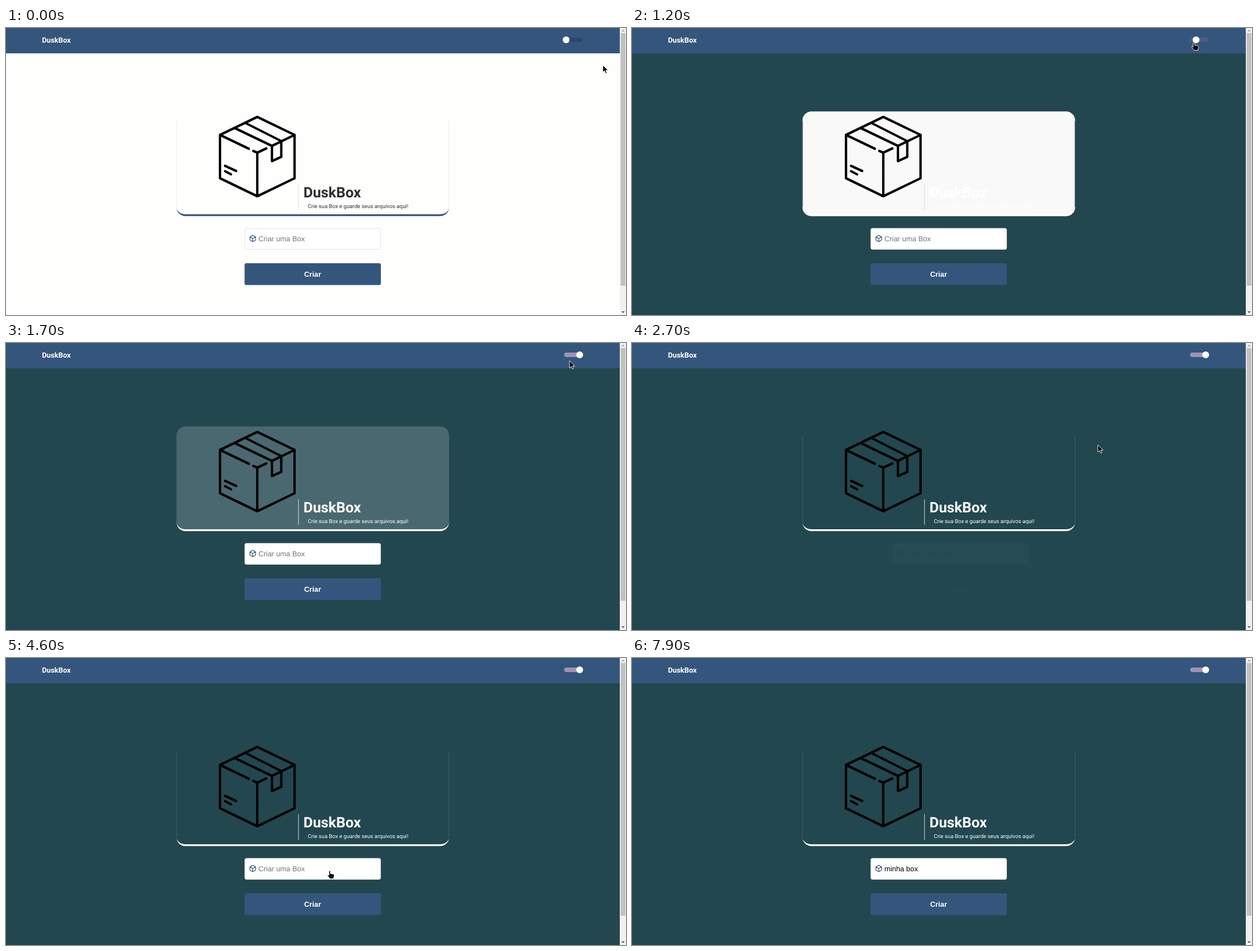
These frames come from a looping animation (1098x510 px, 8000 ms). An HTML page:

```html
<!DOCTYPE html>
<html lang="pt">
<head>
<meta charset="utf-8">
<title>DuskBox</title>
<style>
  html, body { margin: 0; width: 100%; height: 100%; overflow: hidden; }
  svg { display: block; width: 1098px; height: 510px; --page: #fefefd; --ink: #2f2f2f; --accent: #35567c; --side: #e9e9ea; --edge: #35567c; }
  svg.dark { --page: #22474f; --ink: #fff; --side: #43626a; --edge: #fefefe; }
  text { text-rendering: geometricPrecision; white-space: pre; }
  .brand { font-family: Roboto, sans-serif; font-weight: 700; }
  .control { font: 12.86px "Liberation Sans", Arial, sans-serif; }
  .line { fill: none; stroke-linecap: round; stroke-linejoin: round; }
</style>
</head>
<body>
<svg id="stage" viewBox="0 0 1098 510">
  <rect width="1098" height="510" fill="var(--page)"/>
  <rect width="1087" height="45" fill="#35567c"/>
  <text class="brand" x="63.7" y="25.6" font-size="12.86" fill="#fff">DuskBox</text>
  <rect id="track" x="988.5" y="17" width="32.5" height="8" rx="4"/>
  <circle id="knob" cy="21" r="6.1" fill="#fefeff"/>

  <rect id="card" x="301.8" y="148.3" width="483" height="185.9" rx="16" fill="#fdfdfd"/>
  <path d="M302.2 165V318M784.4 165V318" stroke="var(--side)" stroke-width=".9"/>
  <path fill="var(--edge)" d="M301.8 318A16 16 0 0 0 318 334.2H768.6A16 16 0 0 0 784.8 318A16 13 0 0 1 768.6 331H318A16 13 0 0 1 301.8 318Z"/>
  <path class="line" stroke="#000" stroke-width="4.2" d="M379 190L445 158L511 190V267L445 299L379 267ZL430 214.5M438 218.5L445 221.5L461 214M445 221.5V299M423.5 168.5L487.5 201V229L471 236.5V209.5L405.5 178M471 209.5L511 190M388 245L407.5 254M388 254.5L398.5 260"/>
  <path d="M518 277.5V323" stroke="#ddd"/>
  <text class="brand" x="526.7" y="301.4" font-size="25.72" fill="var(--ink)">DuskBox</text>
  <text x="534.5" y="320" font-family="Roboto, sans-serif" font-size="9.65" fill="var(--ink)">Crie sua Box e guarde seus arquivos aqui!</text>

  <g id="form">
    <rect x="422.9" y="355.9" width="240.6" height="37.6" rx="3" fill="#fff" stroke="#ddd" stroke-width=".8"/>
    <path class="line" stroke="#35567c" stroke-width="1.25" d="M437 368.4L442 371.2V377L437 379.8L432 377V371.2ZM432.2 371.3L437 374L441.8 371.3M437 374V379.6"/>
    <text id="field" class="control" x="447" y="378.6"></text>
    <rect id="caret" y="368" width="1" height="14"/>
    <rect x="422.5" y="418" width="241.4" height="38.8" rx="3" fill="#35567c"/>
    <text class="control" x="543" y="441.6" text-anchor="middle" font-weight="700" style="font-weight:700" fill="#fff">Criar</text>
  </g>

  <rect x="1087" width="11" height="510" fill="#f1f1f1"/>
  <rect x="1088.5" y="9" width="8.5" height="449" fill="#c1c1c1"/>
  <path d="M1089.8 6L1092.8 3L1095.8 6Z" fill="#a3a3a3"/>
  <path d="M1089.8 503.5L1092.8 506.5L1095.8 503.5Z" fill="#505050"/>

  <g id="cursor" stroke="#fff" stroke-width=".9" stroke-linejoin="round">
    <path id="arrow" d="M0 0V12.8L3 10.1L5 14.8L7.2 13.9L5.2 9.4H9.2Z"/>
    <path id="hand" d="M3 1.5Q3 0 4.3 0Q5.6 0 5.6 1.5V5L10.4 6Q12.4 6.5 12.3 8.7L11.3 12V14.2H4.5L.8 9.2Q0 7.4 1.5 7.2L3 8.4Z"/>
  </g>
</svg>
<script>
const LOOP = 8000, STEP = 100, THEME_AT = 1200, FORM_AT = 2655;
const $ = id => document.getElementById(id);
const set = (id, attrs) => {
  for (const [name, value] of Object.entries(attrs)) $(id).setAttribute(name, value);
};
const clamp = v => Math.min(1, Math.max(0, v));
const latest = (keys, t) => keys.findLast(key => key[0] <= t);

// time, x, y, shape
const pointer = [
  [0, 1057, 66, 'arrow'], [300, 1037, 42, 'arrow'], [500, 1015, 15, 'hand'],
  [700, 1010, 13, 'hand'], [800, 1003, 18, 'hand'], [900, 995, 23, 'hand'], [1000, 991, 25.5, 'hand'],
  [1300, 986, 38, 'arrow'], [1400, 982, 49.5, 'arrow'], [1500, 985, 46, 'arrow'], [1600, 992, 39, 'arrow'],
  [1700, 998, 31.5, 'arrow'], [1800, 940, 90, 'arrow'], [1900, 740, 220, 'arrow'], [2000, 541, 315, 'arrow'],
  [2100, 825, 181, 'arrow'], [2800, 800, 198, 'arrow'], [2900, 775, 215, 'arrow'], [3000, 750, 232, 'arrow'],
  [3100, 727.5, 247, 'arrow'], [3600, 999, 23, 'hand'], [3700, 569, 379, 'hand'], [4600, 569, 378, 'hand'],
  [7900, 0, 0, 'none']
];
const typing = [
  [6000, 'm'], [6200, 'mi'], [6400, 'min'], [6500, 'minh'], [6600, 'minha '],
  [7100, 'minha b'], [7200, 'minha bo'], [7300, 'minha box']
];
const caretSwitches = [3900, 4300, 5000, 5600, 6000, 7800];
const cardFade = [.98, .78, .53, .38, .27, .18, .1, .04, 0];

// CSS "ease": cubic-bezier(.25, .1, .25, 1)
function ease(x) {
  const bezier = (a, b, u) => 3 * a * u * (1 - u) ** 2 + 3 * b * u * u * (1 - u) + u ** 3;
  let low = 0, high = 1;
  for (let i = 0; i < 20; i++) {
    const mid = (low + high) / 2;
    if (bezier(.25, .25, mid) < x) low = mid; else high = mid;
  }
  return bezier(.1, 1, low);
}

function draw(t) {
  const dark = t >= THEME_AT;
  $('stage').classList.toggle('dark', dark);
  set('card', { opacity: dark ? cardFade[(t - THEME_AT) / STEP] ?? 0 : 0 });

  const on = dark ? clamp(.29 + (t - THEME_AT) / 200 * .71) : 0;
  const mix = (a, b) => a + (b - a) * on;
  set('knob', { cx: mix(992, 1016) });
  set('track', { fill: `rgb(${mix(44, 161)},${mix(71, 147)},${mix(104, 184)})` });

  const shown = t < FORM_AT ? 1 : ease(clamp((t - FORM_AT) / 1000));
  set('form', { opacity: shown, transform: `translate(${40 * (1 - shown)} 0)` });

  const typed = latest(typing, t)?.[1] ?? '';
  const field = $('field');
  field.textContent = typed || 'Criar uma Box';
  set('field', { fill: typed ? '#000' : '#757575' });
  const caretOn = caretSwitches.filter(at => at <= t).length % 2;
  set('caret', { x: 447 + (typed ? field.getComputedTextLength() : 0), opacity: caretOn });

  const [, x, y, shape] = latest(pointer, t);
  set('cursor', { transform: `translate(${x} ${y})` });
  for (const id of ['arrow', 'hand']) set(id, { visibility: id === shape ? 'visible' : 'hidden' });
}

const start = performance.now();
function tick() {
  const t = (performance.now() - start) % LOOP;
  draw(Math.floor(t / STEP) * STEP);
  requestAnimationFrame(tick);
}
tick();
</script>
</body>
</html>
```
